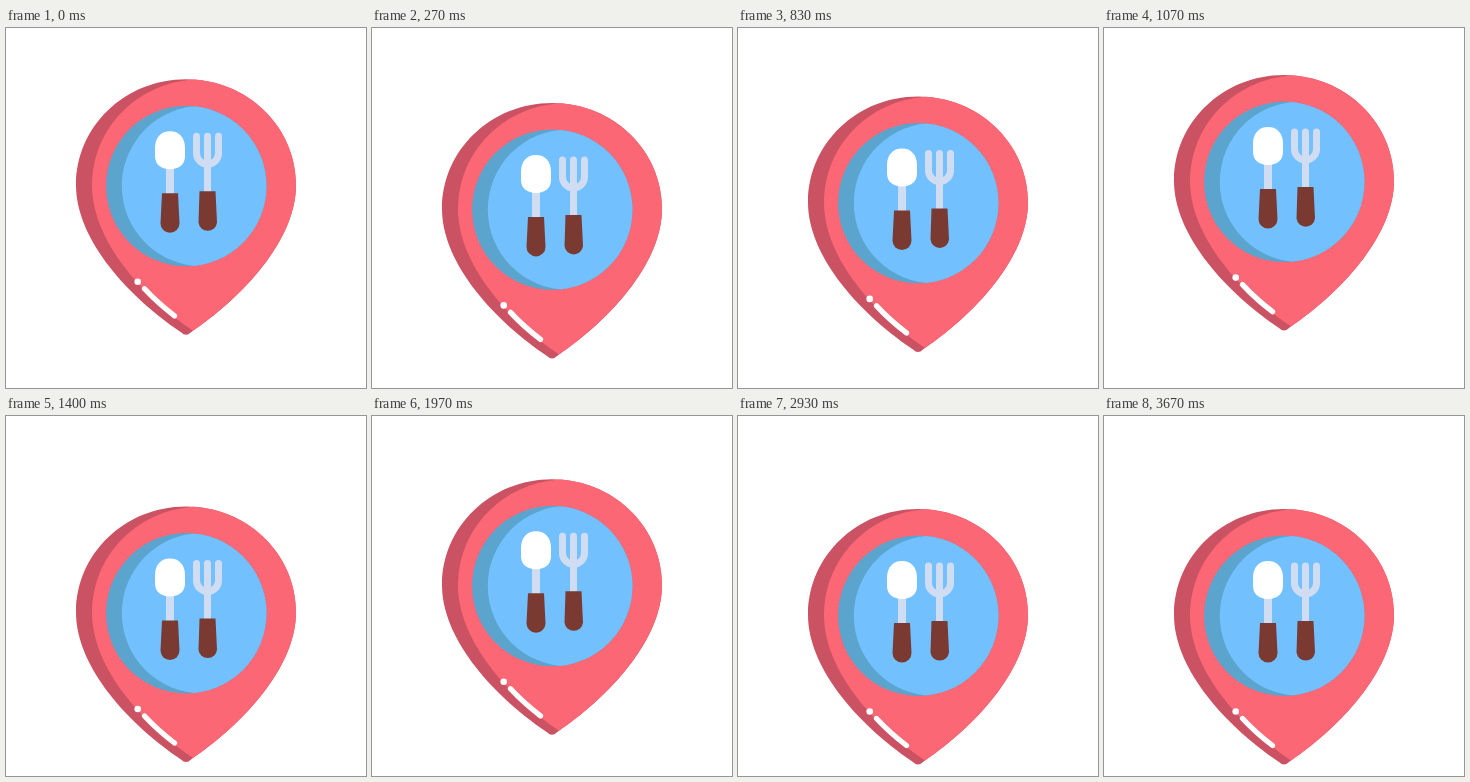
An HTML page that plays this animation: 360 by 360 pixels, repeating every 4.13 s.

```html
<!DOCTYPE html>
<html lang="en">
<head>
<meta charset="utf-8">
<title>Bouncing restaurant pin</title>
<style>
  html, body { margin: 0; width: 100%; height: 100%; overflow: hidden; background: #fff; }
  svg { display: block; width: 100vw; height: 100vh; }
</style>
</head>
<body>
<svg viewBox="0 0 360 360">
  <g id="pin">
    <!-- pin body: shaded side, then face -->
    <path fill="#cb5263" d="M70 199C70 140 119 93 180 93S290 140 290 199C290 249 245 305 185 346Q180 351 175 346C115 305 70 249 70 199Z"/>
    <path fill="#fb6774" d="M187 344.500C150 320 86 262 86 199C86 143 130 97 188 93.300C245 97 290 143 290 199C290 249 245 304 187 344.500Z"/>

    <!-- plate -->
    <circle cx="180.300" cy="199.700" r="80.200" fill="#5aa4cd"/>
    <path fill="#73c0ff" d="M188 119.900A80.200 80.200 0 0 1 188 279.500A80.200 80.200 0 0 1 188 119.900Z" display="none"/>
    <clipPath id="plate"><circle cx="180.300" cy="199.700" r="80.200"/></clipPath>
    <circle cx="196" cy="199.700" r="80.200" fill="#73c0ff" clip-path="url(#plate)"/>

    <!-- spoon -->
    <path fill="#d0dcf2" d="M160 178H168V209H160Z"/>
    <path fill="#fff" d="M149 162C149 151 155 145 164 145S179 151 179 162V170C179 178 173 183 164 183S149 178 149 170Z"/>
    <path fill="#7a3a32" d="M156 207H172L173.500 237A9.500 9.500 0 0 1 154.500 237Z"/>

    <!-- fork -->
    <path fill="none" stroke="#d0dcf2" stroke-width="7" stroke-linecap="round" d="M190.500 150V167A11 11 0 0 0 212.500 167V150M201.500 150V204"/>
    <path fill="#7a3a32" d="M193.500 205H209.500L211 236.200A9.300 9.300 0 0 1 192.500 236.200Z"/>

    <!-- highlight -->
    <circle cx="131.700" cy="295.500" r="3.300" fill="#fff"/>
    <path fill="none" stroke="#fff" stroke-width="5.300" stroke-linecap="round" d="M138.500 302.500Q152 317 168.500 329.500"/>
  </g>
</svg>
<script>
  const LOOP = 4130;
  // [time in ms, vertical offset from rest]
  const keys = [[0, -41.7], [490, -1], [560, -1], [1085, -46], [1440, -1], [1940, -31], [2190, 0], [LOOP, 0]];
  const pin = document.getElementById('pin');
  const ease = u => u * u * (3 - 2 * u);

  function offset(t) {
    const i = keys.findIndex(k => k[0] > t);
    const [t0, y0] = keys[i - 1], [t1, y1] = keys[i];
    return y0 + (y1 - y0) * ease((t - t0) / (t1 - t0));
  }

  const start = performance.now();
  function draw() {
    const t = (performance.now() - start) % LOOP;
    pin.setAttribute('transform', `translate(0 ${offset(t).toFixed(2)})`);
    requestAnimationFrame(draw);
  }
  draw();
</script>
</body>
</html>
```
